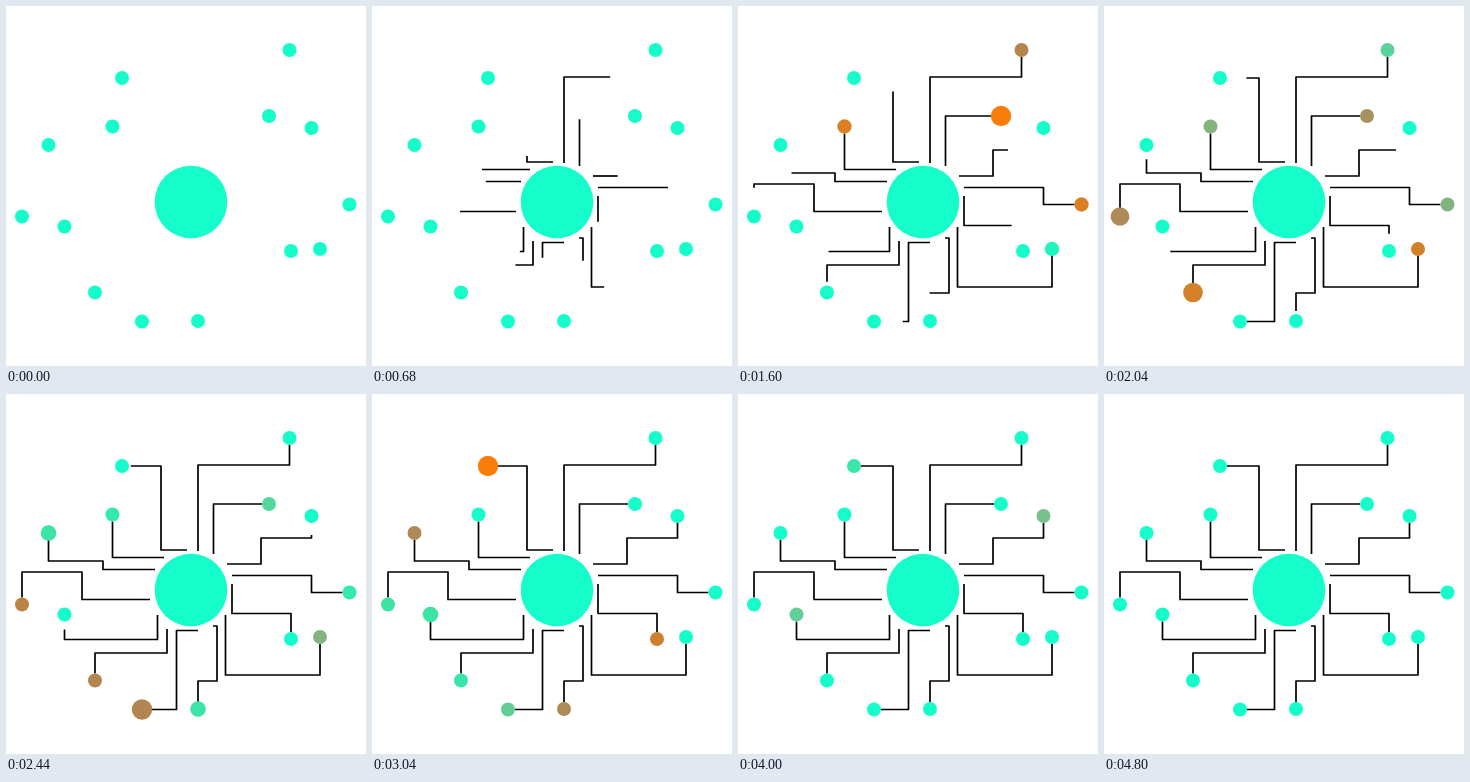
These frames come from a looping animation (360x360 px, 5000 ms). An HTML page with a canvas:

```html
<!DOCTYPE html>
<html lang="en">
<head>
<meta charset="utf-8">
<title>Circuit hub</title>
<style>
  html, body { margin: 0; width: 100%; height: 100%; overflow: hidden; background: #fff; }
  canvas { display: block; width: 360px; height: 360px; }
</style>
</head>
<body>
<canvas id="stage" width="360" height="360"></canvas>
<script>
const ctx = document.getElementById('stage').getContext('2d');
const LOOP = 5000, STEP = 40, START = 200, DOT = 7;
const RISE = 260, SHRINK = 170, COOL = 1200;
const TEAL = [20, 253, 203];

// Colour stops of a pulse: [heat, rgb]
const WARM = [
  [0, TEAL], [0.25, [60, 228, 166]], [0.5, [115, 196, 143]],
  [0.75, [178, 133, 82]], [0.88, [208, 129, 42]], [1, [250, 125, 12]]
];
const GREY = [[0, TEAL], [1, [128, 128, 128]]];

// A wire leaves the hub, turns at right angles and ends in its node's centre.
// dur: drawing time, peak: moment of the node's pulse
const wire = (d, dur, peak, heat = 1) => {
  const [, x0, y0, rest] = d.match(/M([\d.]+) ([\d.]+)(.*)/);
  let x = +x0, y = +y0, len = -DOT;
  for (const [, axis, v] of rest.matchAll(/([HV])([\d.]+)/g)) {
    if (axis === 'H') { len += Math.abs(v - x); x = +v; }
    else { len += Math.abs(v - y); y = +v; }
  }
  return { path: new Path2D(d), len, x, y, dur, peak, heat };
};

const wires = [
  wire('M192 157V71H283.5V44', 800, 1240),
  wire('M207.5 160V110H263', 1130, 1600),
  wire('M221 170H255V144H305.5V122', 2622, 3340),
  wire('M226 181.5H305.5V198.5H343.5', 980, 1440),
  wire('M226 190V219.5H285V245', 2155, 2820),
  wire('M219.5 221V281H314V243', 1360, 1840),
  wire('M207 232H211V287H192V315', 1944, 2635),
  wire('M192 236.5H170.5V315.5H136', 1832, 2440, 0.75),
  wire('M161 235V259H89V286.5', 1486, 2070),
  wire('M151.5 221V245.5H58.5V220.5', 2482, 3235),
  wire('M144 205.5H76V178H16V210.5', 1703, 2110),
  wire('M149 175.5H97V167H42.5V139', 2017, 2635),
  wire('M158 163.5H106.5V120.5', 980, 1440),
  wire('M181 156H155V72H116', 2295, 3040)
];

const clamp = v => Math.max(0, Math.min(1, v));
const ease = x => x + 0.48 * x * x * (1 - x);

function ramp(stops, m) {
  let i = 1;
  while (i < stops.length - 1 && m > stops[i][0]) i++;
  const [a, from] = stops[i - 1], [b, to] = stops[i];
  const k = clamp((m - a) / (b - a));
  return `rgb(${from.map((c, j) => Math.round(c + (to[j] - c) * k))})`;
}

function disc(x, y, r, fill) {
  ctx.fillStyle = fill;
  ctx.beginPath();
  ctx.arc(x, y, r, 0, Math.PI * 2);
  ctx.fill();
}

function drawWire(w, t) {
  const p = ease(clamp((t - START) / w.dur));
  if (!p) return;
  ctx.setLineDash([w.len * p, 999]);
  ctx.stroke(w.path);
}

function drawNode(w, t) {
  const u = t - w.peak;
  const up = clamp(1 + u / RISE);
  const heat = u < 0 ? up : 1 - clamp(u / COOL) ** 1.2;
  const swell = u < 0 ? up : clamp(1 - u / SHRINK);
  // Early pulses are still grey
  const stops = t < 1420 ? GREY : WARM;
  disc(w.x, w.y, DOT + 3.2 * swell, ramp(stops, heat * w.heat));
}

function draw(t) {
  ctx.fillStyle = '#fff';
  ctx.fillRect(0, 0, 360, 360);
  ctx.strokeStyle = '#000';
  ctx.lineWidth = 1.7;
  ctx.lineJoin = 'round';
  wires.forEach(w => drawWire(w, t));
  wires.forEach(w => drawNode(w, t));
  disc(185, 196, 36.3, ramp(WARM, 0));
}

let begin;
function frame(now) {
  begin ??= now;
  const t = (now - begin) % LOOP;
  draw(Math.floor(t / STEP) * STEP);
  requestAnimationFrame(frame);
}
draw(0);
requestAnimationFrame(frame);
</script>
</body>
</html>
```
